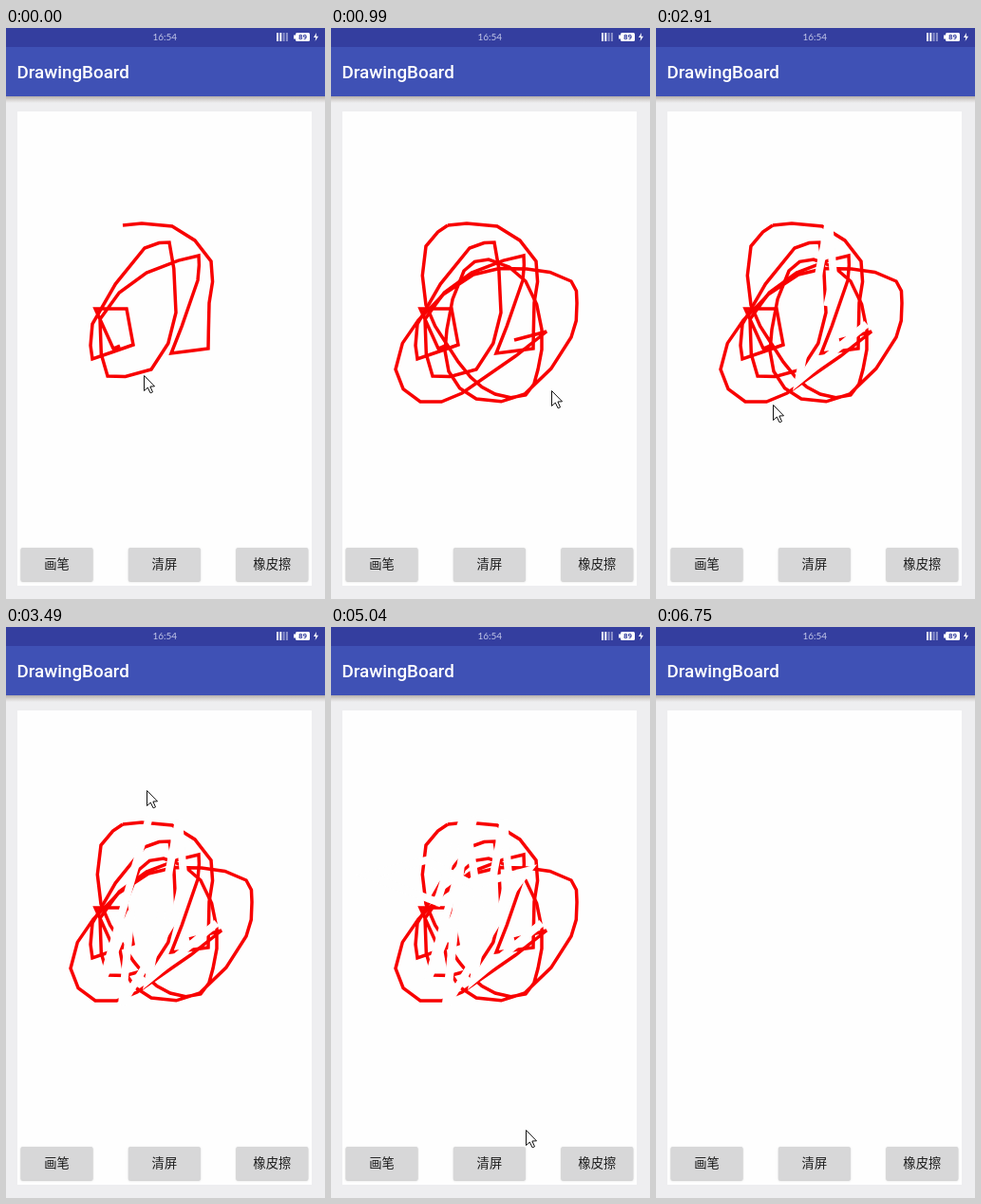
An HTML page with a canvas for the animation above (7.19 s loop, 336 px wide and 602 px high).

```html
<!DOCTYPE html>
<html lang="zh-CN">
<head>
<meta charset="utf-8">
<title>DrawingBoard</title>
<style>
html, body { margin: 0; width: 100%; height: 100%; overflow: hidden; background: #eeeef0; }
canvas { display: block; width: 336px; height: 602px; }
</style>
</head>
<body>
<canvas id="stage"></canvas>
<script>
const W = 336, H = 602, LOOP = 7190, HOLD = 140;
const DRAW = 150, RUB = 2480, RUB_AGAIN = 3640, CLEAR = 5590, GONE = 6750;
const RED = '#f80000', PAPER = '#fefefe';

const canvas = document.getElementById('stage');
const ctx = canvas.getContext('2d');
const dpr = window.devicePixelRatio || 1;
canvas.width = W * dpr;
canvas.height = H * dpr;

// A polyline with its length and the point at any fraction.
function makePath(pts) {
  const seg = pts.slice(1).map((p, i) => Math.hypot(p[0] - pts[i][0], p[1] - pts[i][1]));
  const length = seg.reduce((a, b) => a + b, 0);
  const at = f => {
    let d = Math.max(0, Math.min(1, f)) * length, i = 0;
    while (i < seg.length - 1 && d > seg[i]) d -= seg[i++];
    const k = d / seg[i], a = pts[i], b = pts[i + 1];
    return [a[0] + (b[0] - a[0]) * k, a[1] + (b[1] - a[1]) * k];
  };
  return { pts, length, at };
}

// Unit tangent at a key point; sharp turns and ends have none.
function tangent(keys, i) {
  const a = keys[i - 1], b = keys[i], c = keys[i + 1];
  if (!a || !c) return [0, 0];
  const u = [b[0] - a[0], b[1] - a[1]], v = [c[0] - b[0], c[1] - b[1]];
  const cos = (u[0] * v[0] + u[1] * v[1]) / (Math.hypot(...u) * Math.hypot(...v));
  const len = Math.hypot(c[0] - a[0], c[1] - a[1]);
  return cos < 0.2 ? [0, 0] : [(c[0] - a[0]) / len, (c[1] - a[1]) / len];
}

// Hand-drawn line: a rounded middle point between each pair of keys.
function handLine(keys) {
  const pts = [keys[0]];
  for (let i = 1; i < keys.length; i++) {
    const a = keys[i - 1], b = keys[i];
    const m = tangent(keys, i - 1), n = tangent(keys, i);
    const d = Math.hypot(b[0] - a[0], b[1] - a[1]) / 8;
    pts.push([0, 1].map(j => (a[j] + b[j]) / 2 + (m[j] - n[j]) * d), b);
  }
  return makePath(pts);
}

const scribble = handLine([
  [120, 335], [113, 338], [94, 296], [127, 296], [134, 334], [91, 349], [91, 312],
  [146, 232], [172, 226], [179, 300], [153, 360], [107, 367], [99, 307], [148, 258],
  [203, 240], [202, 266], [174, 343], [213, 338], [214, 290], [216, 246], [175, 209], [123, 208]
]);
const loops = handLine([
  [123, 208], [100, 230], [100, 292], [123, 335], [147, 368], [173, 386], [205, 387],
  [218, 360], [222, 318], [205, 267], [166, 244], [140, 256], [122, 318], [124, 362],
  [153, 391], [204, 386], [253, 326], [259, 290], [253, 267], [206, 254], [150, 260],
  [92, 308], [68, 360], [94, 394], [138, 385], [227, 320], [193, 329]
]);
const rub = makePath([
  [222, 312], [150, 372], [182, 203], [187, 262], [177, 308], [122, 398], [132, 300],
  [102, 372], [151, 200]
]);
const rubAgain = makePath([
  [148, 172], [112, 290], [39, 262], [100, 246], [150, 272], [207, 257], [160, 320],
  [142, 203], [118, 425]
]);

// Free pointer moves: start, end, x, y.
const moves = [
  [990, 990, 232, 382], [1110, 1110, 281, 486], [1110, 1650, 288, 565],
  [1930, 2080, 282, 565], [2350, 2350, 200, 420], [4480, 4480, 135, 274],
  [4480, 5040, 205, 530], [5040, 5320, 182, 584], [5590, 5590, 177, 567],
  [5740, 6590, 307, 599]
];

// How many pictures have changed since start.
const step = (t, start, max, every = HOLD) =>
  Math.max(0, Math.min(max, Math.floor((t - start) / every + 1.02)));

function rect(x, y, w, h, fill) {
  ctx.fillStyle = fill;
  ctx.fillRect(x, y, w, h);
}

function roundBox(x, y, w, h, r) {
  ctx.beginPath();
  ctx.roundRect(x, y, w, h, r);
}

function text(str, x, y, font, fill, align = 'center') {
  ctx.font = font;
  ctx.fillStyle = fill;
  ctx.textAlign = align;
  ctx.fillText(str, x, y);
}

function polygon(pts, x, y) {
  ctx.beginPath();
  pts.forEach(p => ctx.lineTo(x + p[0], y + p[1]));
  ctx.closePath();
}

function stroke(path, f, color, width) {
  if (f <= 0) return;
  ctx.beginPath();
  path.pts.forEach(p => ctx.lineTo(p[0], p[1]));
  ctx.setLineDash(f < 1 ? [path.length * f, path.length] : []);
  ctx.strokeStyle = color;
  ctx.lineWidth = width;
  ctx.miterLimit = 4;
  ctx.stroke();
  ctx.setLineDash([]);
}

function drawBars() {
  rect(0, 0, W, 20, '#343e9f');
  rect(0, 20, W, 52, '#3f51b5');
  const shade = ctx.createLinearGradient(0, 72, 0, 79);
  shade.addColorStop(0, '#b4afab');
  shade.addColorStop(0.5, '#d6d3d1');
  shade.addColorStop(1, '#eeeef0');
  rect(0, 72, W, 7, shade);

  text('16:54', 167.3, 13.3, '10px Lato, sans-serif', '#c3c7e8');
  text('DrawingBoard', 11.5, 53, '500 18.8px Roboto, sans-serif', '#fff', 'left');

  for (let i = 0; i < 4; i++) rect(285 + i * 3.3, 5, 2, 9, i < 2 ? '#fff' : '#8c92cb');
  roundBox(305, 5, 15, 9, 1.5);
  ctx.fillStyle = '#fff';
  ctx.fill();
  rect(303, 7.5, 2, 4, '#fff');
  text('89', 312.5, 12.4, 'bold 8px Roboto, sans-serif', '#343e9f');
  polygon([[3, 0], [0, 5], [2.3, 5], [1.6, 9], [5, 3.8], [2.7, 3.8]], 324, 5);
  ctx.fillStyle = '#fff';
  ctx.fill();
}

function drawButton(label, i, lift, ripple) {
  const x = 15.5 + i * 113.4;
  ctx.save();
  ctx.shadowColor = `rgba(0,0,0,${0.22 + lift * 0.15})`;
  ctx.shadowBlur = (1.5 + lift * 2) * dpr;
  ctx.shadowOffsetY = (0.6 + lift * 0.7) * dpr;
  roundBox(x, 548, 76, 35.5, 2);
  ctx.fillStyle = '#d7d7d8';
  ctx.fill();
  ctx.restore();
  if (ripple) {
    ctx.save();
    ctx.clip();
    ctx.beginPath();
    ctx.arc(177, 567, 44, 0, 7);
    ctx.fillStyle = `rgba(0,0,0,${0.07 * ripple})`;
    ctx.fill();
    ctx.restore();
  }
  text(label, x + 38, 570.4, '13.3px "Noto Sans CJK SC", "Noto Sans CJK", sans-serif', '#1c1c1c');
}

function drawArrow(x, y) {
  polygon([[0, 0], [0, 16], [3.8, 12.6], [6.6, 18.3], [9, 17.3], [6.4, 11.5], [11, 11.3]], x + 0.5, y + 0.5);
  ctx.fillStyle = '#fff';
  ctx.fill();
  ctx.strokeStyle = '#111';
  ctx.lineWidth = 1;
  ctx.stroke();
}

function freePointer(t) {
  let x = 0, y = 0;
  for (const [from, to, nx, ny] of moves) {
    if (t < from) break;
    const n = Math.max(1, Math.round((to - from) / HOLD));
    const k = to > from ? Math.min(1, Math.floor((t - from) / (to - from) * n + 0.02) / n) : 1;
    x += (nx - x) * k;
    y += (ny - y) * k;
  }
  return [x, y];
}

function draw(t) {
  ctx.setTransform(dpr, 0, 0, dpr, 0, 0);
  rect(0, 0, W, H, '#eeeef0');
  rect(12, 88, 310, 500, PAPER);
  drawBars();

  const pen = step(t, DRAW, 7);
  const a = step(t, RUB, 8, 143);
  const b = step(t, RUB_AGAIN, 7, 142);

  if (t < CLEAR) {
    stroke(scribble, 1, RED, 3.5);
    stroke(loops, pen / 7, RED, 3.5);
    stroke(rub, (a - 1) / 7, PAPER, 8);
    stroke(rubAgain, (b - 1) / 6, PAPER, 8);
  }

  const fade = t < CLEAR ? 0 : Math.max(0, 1 - Math.floor((t - CLEAR) / HOLD) / 3);
  const press = t >= 1930 && t < 2080 ? 1 : 0;
  drawButton('画笔', 0, 0, 0);
  drawButton('清屏', 1, fade, fade);
  drawButton('橡皮擦', 2, press, 0);

  // On the board the pointer runs one step ahead of the ink.
  let p = freePointer(t);
  if (pen < 7) p = loops.at((pen + 1) / 7);
  else if (a > 0 && a < 8) p = rub.at(a / 7);
  else if (a === 8 && b < 7) p = rubAgain.at(b / 6);
  if (t < GONE) drawArrow(Math.round(p[0]), Math.round(p[1]));
}

const start = performance.now();
function tick() {
  draw((performance.now() - start) % LOOP);
  requestAnimationFrame(tick);
}
tick();
</script>
</body>
</html>
```
